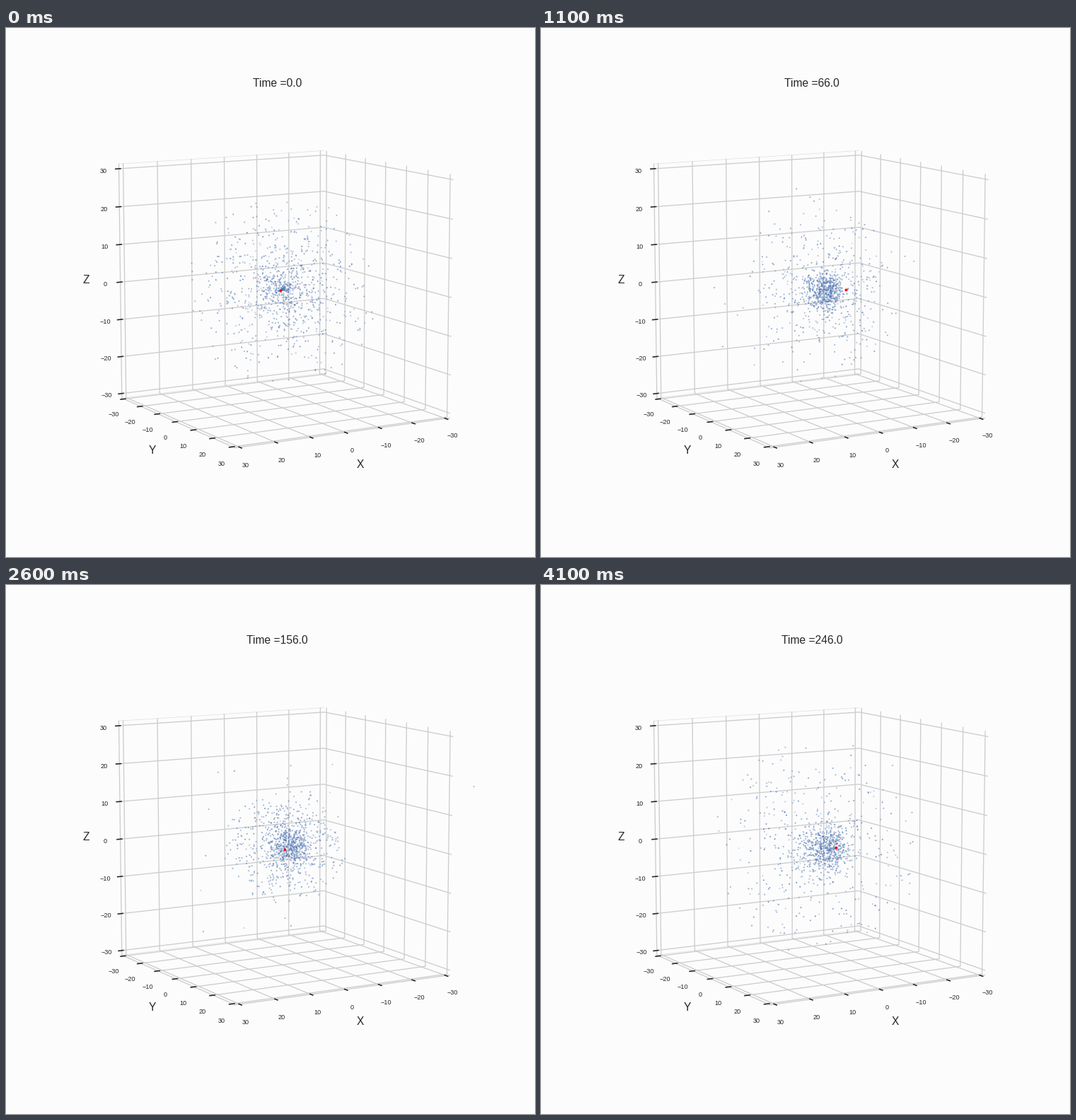
Animation, 748 px wide and 748 px high, one loop 4200 ms. Source, as a matplotlib script:

```python
import numpy as np
import matplotlib.pyplot as plt
from matplotlib.animation import FuncAnimation
from matplotlib.colors import to_rgb

SIZE, DPI = 748, 93.5
FRAMES, INTERVAL = 42, 100
TIME_STEP = 6.0
INK, GRID, BACK = "#262626", "#cccccc", "#fcfcfc"
BLUE, RED = to_rgb("#4c72b0"), "#ff0000"

plt.rcParams["font.family"] = "Liberation Sans"

# Camera
ELEV, AZIM = np.radians(10), np.radians(60)
DIST, UNIT = 10.0, 1.0563 / 60
FOCAL = 0.77 * SIZE / 0.185
CX, CY = 391.1, 370.0

TICKS = range(-30, 31, 10)
EDGE = 31.25
LABEL_EDGE = EDGE + 3.05


def project(x, y, z):
    """Return pixel x, pixel y and nearness of a point in data units."""
    x, y, z = (np.asarray(v, float) * UNIT for v in (x, y, z))
    side = -np.sin(AZIM) * x + np.cos(AZIM) * y
    front = np.cos(AZIM) * x + np.sin(AZIM) * y
    near = np.cos(ELEV) * front + np.sin(ELEV) * z
    up = np.cos(ELEV) * z - np.sin(ELEV) * front
    k = FOCAL / (DIST - near)
    return CX + k * side, CY - k * up, near


fig = plt.figure(figsize=(SIZE / DPI, SIZE / DPI), dpi=DPI, facecolor=BACK)
ax = fig.add_axes([0, 0, 1, 1])
ax.set_xlim(0, SIZE)
ax.set_ylim(SIZE, 0)
ax.axis("off")


def line(*points, color=GRID, width=1.0, order=1):
    px, py, _ = project(*zip(*points))
    ax.plot(px, py, color=color, lw=width, zorder=order,
            solid_capstyle="round")


def tick_label(value, point):
    px, py, _ = project(*point)
    text = str(value).replace("-", "\u2212")
    ax.text(px, py, text, size=7, color=INK, ha="center", va="top")


def draw_box():
    e, far = EDGE, LABEL_EDGE
    outer, inner = e + 1.0, e - 0.5
    for z in (e, -e):
        line((e, -e, z), (-e, -e, z), color="#dddddd", width=0.5)
    for t in TICKS:
        line((t, e, -e), (t, -e, -e), (t, -e, e))
        line((e, t, -e), (-e, t, -e), (-e, t, e))
        line((e, -e, t), (-e, -e, t), (-e, e, t))
    line((e, -e, -e), (e, -e, e))
    line((e, -e, -e), (e, e, -e))
    line((e, e, -e), (-e, e, -e))
    for t in TICKS:
        mark = dict(color=INK, width=1.25, order=2)
        line((t, outer, -e), (t, inner, -e), **mark)
        line((outer, t, -e), (inner, t, -e), **mark)
        line((outer, -e, t), (inner, -e, t), **mark)
        tick_label(t, (t, far, -far))
        tick_label(t, (far, t, -far))
        tick_label(t, (far, -far, t))
    for name, px, py in (("X", 500.5, 622.4), ("Y", 207, 602.4),
                         ("Z", 113, 361.4)):
        ax.text(px, py, name, size=12, color=INK, ha="center")


def simulate(count=1000, radius=25.0, mass=1.25, soft=5.0, spread=0.065):
    """Collapse of a cool star cluster under its own radial gravity."""
    rng = np.random.default_rng(7)
    pos = rng.normal(size=(count, 3))
    pos /= np.linalg.norm(pos, axis=1)[:, None]
    pos *= radius * rng.random(count)[:, None]
    vel = rng.normal(scale=spread, size=(count, 3))
    share = np.arange(1, count + 1) / count

    def pull(p):
        r = np.linalg.norm(p, axis=1)
        inside = np.empty(count)
        inside[np.argsort(r)] = share
        return -(mass * inside / (r * r + soft * soft) ** 1.5)[:, None] * p

    states, dt = [pos.copy()], 0.5
    acc = pull(pos)
    for _ in range(FRAMES - 1):
        for _ in range(int(TIME_STEP / dt)):
            vel += 0.5 * dt * acc
            pos += dt * vel
            acc = pull(pos)
            vel += 0.5 * dt * acc
        states.append(pos.copy())
    return states


KNOTS = np.array([0, 8, 15, 19, 26, 34, 41], float)


def smooth(values, n):
    """Cubic Hermite curve through values at KNOTS."""
    values = np.array(values, float)
    slopes = np.gradient(values, KNOTS)
    i = min(np.searchsorted(KNOTS, n, side="right") - 1, len(KNOTS) - 2)
    h = KNOTS[i + 1] - KNOTS[i]
    t = (n - KNOTS[i]) / h
    return ((1 + 2 * t) * (1 - t) ** 2 * values[i]
            + t * (1 - t) ** 2 * h * slopes[i]
            + t * t * (3 - 2 * t) * values[i + 1]
            + t * t * (t - 1) * h * slopes[i + 1])


def heavy_star(n):
    return (smooth([388, 432.3, 420, 406.3, 394, 402.7, 416.7], n),
            smooth([371, 373.5, 366, 370, 373.5, 370, 371], n))


def cluster(n):
    pos = states[n]
    px, py, near = project(*pos.T)
    core = np.exp(-np.linalg.norm(pos, axis=1) / 12)
    px = px + core * smooth([0, 12, 19, 17, 12, 14, 17], n)
    depth = np.clip(near / (50 * UNIT) + 0.5, 0, 1)
    alpha = 0.3 + 0.7 * depth
    # one star is thrown out to the right
    px = np.append(px, 563 + 8.95 * (n - 15))
    py = np.append(py, 318 - 3.0 * (n - 15))
    alpha = np.append(alpha, 0.6)
    seen = (px > 94) & (px < 672) & (py > 90) & (py < 665)
    colors = np.empty((seen.sum(), 4))
    colors[:, :3] = BLUE
    colors[:, 3] = 0.75 * alpha[seen]
    return np.column_stack([px, py])[seen], colors


draw_box()
states = simulate()
title = ax.text(383.35, 82.8, "", size=12, color=INK, ha="center")
stars = ax.scatter([], [], s=2.7, linewidths=0, zorder=3)
heavy = ax.scatter([], [], s=9, color=RED, linewidths=0, zorder=4)


def update(n):
    points, colors = cluster(n)
    stars.set_offsets(points)
    stars.set_facecolors(colors)
    heavy.set_offsets([heavy_star(n)])
    title.set_text(f"Time ={n * TIME_STEP:.1f}")
    return stars, heavy, title


anim = FuncAnimation(fig, update, frames=FRAMES, interval=INTERVAL,
                     repeat=True, repeat_delay=0, blit=False)
plt.show()
```
